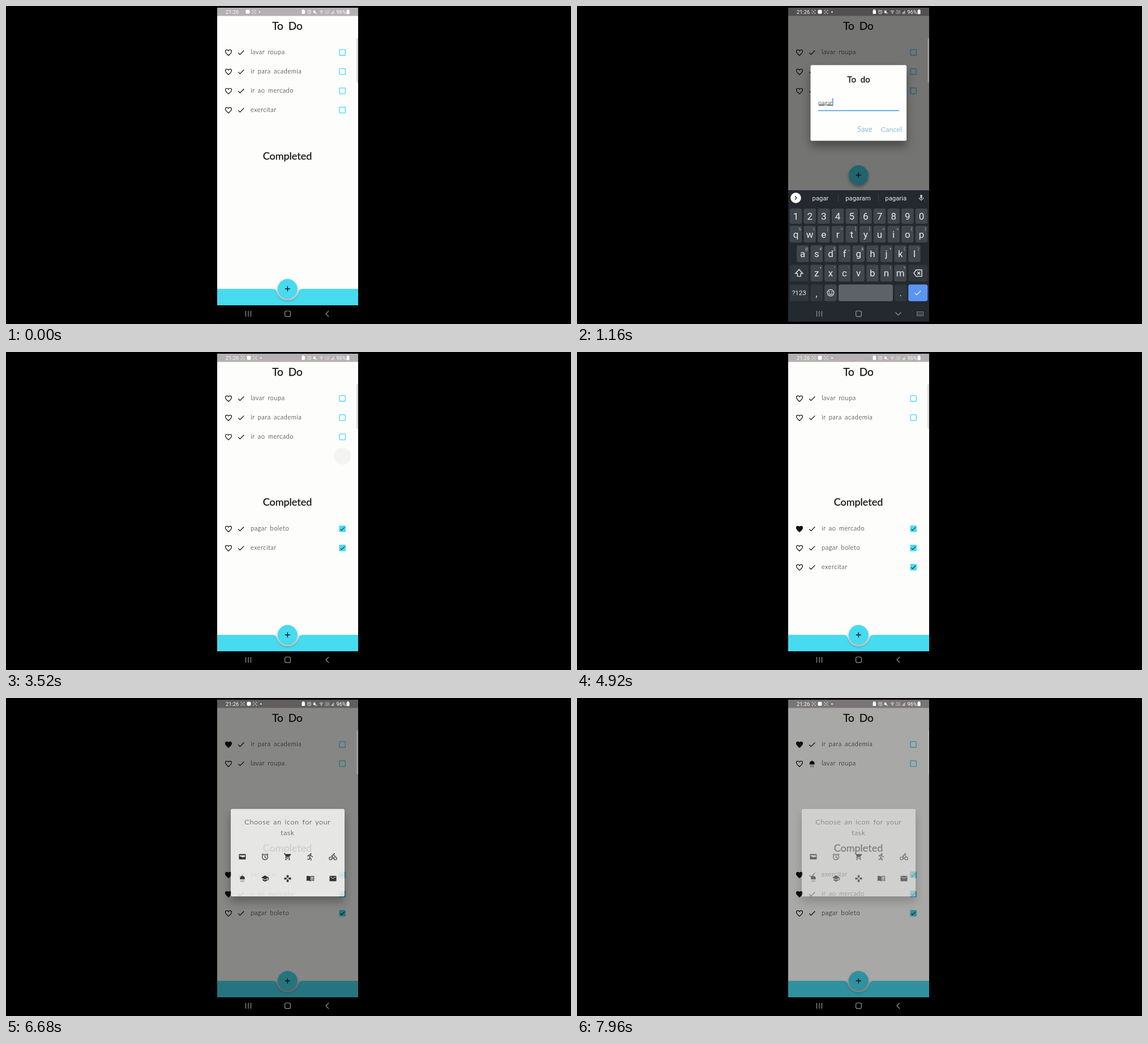
An HTML page for the animation above (8000 ms loop, 998 px wide and 561 px high).

```html
<!DOCTYPE html>
<html lang="pt">
<head>
<meta charset="utf-8">
<title>To Do</title>
<style>
  html, body { margin: 0; width: 100%; height: 100%; overflow: hidden; background: #000; }
  svg { display: block; width: 100vw; height: 100vh; }
  text { white-space: pre; }
  .hand { font-family: Lato, sans-serif; font-weight: 300; }
  .title { font-weight: 400; fill: #111; stroke: #111; stroke-width: .25; word-spacing: 4px; }
  .sys { font-family: Roboto, sans-serif; }
  .mid { text-anchor: middle; }
  .line { fill: none; stroke: currentColor; }
  .raised { filter: drop-shadow(0 3px 2.5px rgba(0,0,0,.33)); }
  .floating { filter: drop-shadow(0 10px 8px rgba(0,0,0,.36)); }
</style>
</head>
<body>
<svg viewBox="0 0 998 561">
  <defs>
    <clipPath id="phone"><rect x="373" y="3" width="249" height="554"/></clipPath>
    <clipPath id="todoArea"><rect id="todoClip" x="373" y="53" width="249" height="204"/></clipPath>
  </defs>
  <rect width="998" height="561" fill="#000"/>
  <g clip-path="url(#phone)">
    <rect x="373" y="3" width="249" height="525" fill="#f3f3f2"/>
    <rect id="page" x="373" y="3" width="249" height="525" fill="#fdfdfb"/>
    <rect x="373" y="3" width="249" height="14.5" fill="#b5b0b3"/>
    <text class="hand mid title" x="497" y="41.5" font-size="19">To Do</text>
    <g id="todo" clip-path="url(#todoArea)"></g>
    <text id="completed" class="hand mid title" x="497" font-size="18">Completed</text>
    <g id="done"></g>
    <path id="bar" class="raised" fill="#47dbf0"/>
    <g id="fab">
      <circle class="raised" r="17.4" fill="#47dbf0"/>
      <circle id="fabPress" r="17.4" fill="#000"/>
      <path d="M-4.4 0h8.8M0-4.4v8.8" stroke="#111" stroke-width="1.4"/>
    </g>
    <g id="ripples"></g>
    <rect id="scrim" x="373" y="3" width="249" height="525"/>
    <rect x="619.6" y="57" width="4" height="78" rx="2" fill="#ccc" fill-opacity=".5" stroke="#999" stroke-opacity=".5" stroke-width=".7"/>
    <g id="taskDialog"></g>
    <g id="iconDialog"></g>
    <g id="keyboard"></g>
    <g id="nav" fill="none" stroke="#999" stroke-width="1.2"></g>
    <g id="status" color="#fff" fill="#fff"></g>
  </g>
</svg>
<script>
const LOOP = 8000, STEP = 40, CYAN = '#47dbf0', KB_TRAVEL = 232, BAR_TOP = 499;
const $ = id => document.getElementById(id);
const clamp = v => Math.max(0, Math.min(1, v));
const ramp = (t, from, to) => clamp((t - from) / (to - from));
const esc = s => s.replace(/&/g, '&amp;').replace(/</g, '&lt;');
const set = (id, attrs) => { for (const k in attrs) $(id).setAttribute(k, attrs[k]); };
const put = (id, html) => { const el = $(id); if (el.lastHtml !== html) el.innerHTML = el.lastHtml = html; };
const text = (x, y, size, s, cls = 'sys mid', extra = '') =>
  `<text class="${cls}" x="${x}" y="${y}" font-size="${size}" ${extra}>${esc(s)}</text>`;
const rect = (x, y, w, h, rx, fill, extra = '') =>
  `<rect x="${x}" y="${y}" width="${w}" height="${h}" rx="${rx}" fill="${fill}" ${extra}/>`;

// Icons on a 24 unit grid
const fillIcon = d => `<path fill-rule="evenodd" d="${d}"/>`;
const lineIcon = (d, w = 2) => `<path class="line" stroke-width="${w}" d="${d}"/>`;
const ring = (x, y, r, w = 1.8) => `<circle class="line" cx="${x}" cy="${y}" r="${r}" stroke-width="${w}"/>`;
const dot = (x, y, r) => `<circle cx="${x}" cy="${y}" r="${r}"/>`;
const heartShape = 'M12 20.2C5 14.2 3 11.800 3 8.500 3 5.800 5 4 7.500 4c1.800 0 3.600 1 4.500 2.700C12.900 5 14.700 4 16.500 4 19 4 21 5.800 21 8.500c0 3.300-2 5.700-9 11.700z';
const icons = {
  heart: lineIcon(heartShape),
  heartFull: fillIcon(heartShape) + lineIcon(heartShape),
  check: fillIcon('M9 16.200L4.800 12l-1.400 1.400L9 19 21 7l-1.400-1.400z'),
  wallet: fillIcon('M4 4h16a2 2 0 0 1 2 2v12a2 2 0 0 1-2 2H4a2 2 0 0 1-2-2V6a2 2 0 0 1 2-2zM4 8v2.500l9 3 7-1.500V8z'),
  alarm: ring(12, 13, 8, 2) + lineIcon('M12 8v5.500l4 2.500M2.500 6.500L7 2.700M21.500 6.500L17 2.700'),
  cart: fillIcon('M1 2h3.300l1 2H21q1.500 0 .8 1.500L17.300 12q-.6 1-1.800 1H8.100L7.200 15H19v2H7q-2.800-.5-1.700-3l1.300-2.400L3 4H1z') + dot(7, 20, 2) + dot(17, 20, 2),
  run: dot(13.5, 3.5, 2) + lineIcon('M5.500 12V8.500l5-2 2.500.5 2 3q1.500 2 4.500 2M11.500 7l-1.500 7.500 4 3V23M10.500 14l-1.300 6-6-1.300', 2.1),
  bike: dot(15.5, 3.5, 2) + ring(5, 17, 4.2) + ring(19, 17, 4.2) + lineIcon('M12 19v-5.500L8.500 10 13 6l3 3q1.500 1.200 3.500 1.200'),
  shower: fillIcon('M11 5V3h2v2a6 6 0 0 1 6 6v3H5v-3a6 6 0 0 1 6-6z') + [8, 12, 16].map(x => dot(x, 17, 1) + dot(x, 20.5, 1)).join(''),
  school: fillIcon('M5 13.200v4L12 21l7-3.800v-4L12 17zM12 3L1 9l11 6 9-4.900V17h2V9z'),
  games: fillIcon('M15 7.500V2H9v5.500l3 3zM7.500 9H2v6h5.500l3-3zM9 16.500V22h6v-5.500l-3-3zM16.500 9l-3 3 3 3H22V9z'),
  book: fillIcon('M1 5q6-2 11 1 5-3 11-1v14q-6-2-11 1-5-3-11-1zM13 8v10q4-2 8-1V6.700q-4-1-8 1.300z') + lineIcon('M14.500 10l5-1M14.500 13l5-1M14.500 16l5-1', 1.3),
  mail: fillIcon('M20 4H4a2 2 0 0 0-2 2v12a2 2 0 0 0 2 2h16a2 2 0 0 0 2-2V6a2 2 0 0 0-2-2zm0 4l-8 5-8-5V6l8 5 8-5z'),
  sticker: lineIcon('M4 3h16v12l-6 6H4zM20 15h-6v6M8 14q3 3 6 0') + dot(9, 9, 1.4) + dot(15, 9, 1.4),
  gear: ring(12, 12, 5.5, 4) + '<circle class="line" cx="12" cy="12" r="8.800" stroke-width="3" stroke-dasharray="4.600"/>',
  mic: '<rect x="9" y="2" width="6" height="12" rx="3"/>' + lineIcon('M5.500 11q0 6 6.500 6t6.500-6M12 17v4'),
  smile: ring(12, 12, 9) + dot(8.5, 9.5, 1.5) + dot(15.5, 9.5, 1.5) + lineIcon('M7 14q5 5 10 0'),
  shift: lineIcon('M12 3L3 13h5v7h8v-7h5z'),
  backspace: lineIcon('M8 4h14v16H8L2 12zM11 8.500l7 7M18 8.500l-7 7'),
  capture: lineIcon('M3 8V3h5M16 3h5v5M21 16v5h-5M8 21H3v-5') + ring(12, 12, 3),
  mute: fillIcon('M3 9h4l6-6v18l-6-6H3z') + lineIcon('M3 3l18 18', 2.5),
  wifi: lineIcon('M2 9q10-9 20 0M6 14q6-5 12 0', 2.5) + dot(12, 19, 2.5)
};
const icon = (name, cx, cy, size = 15, color = '#111') =>
  `<g transform="translate(${cx - size / 2} ${cy - size / 2}) scale(${size / 24})" color="${color}" fill="${color}">${icons[name]}</g>`;

// Task list: each action is a time, what happens, and the task it touches
const actions = [
  [2340, 'add', 'pagar boleto'],
  [2920, 'check', 'exercitar'],
  [3320, 'check', 'pagar boleto'],
  [3760, 'fav', 'ir ao mercado'],
  [4400, 'check', 'ir ao mercado'],
  [5200, 'fav', 'exercitar'],
  [5900, 'fav', 'ir para academia'],
  [7880, 'shower', 'lavar roupa']
];
const rowY = (index, heading) => heading + 47 + index * 33.9;

function tasksAt(t) {
  const make = name => ({ name, icon: 'check' });
  const todo = ['lavar roupa', 'ir para academia', 'ir ao mercado', 'exercitar'].map(make);
  const done = [], taps = [];
  for (const [at, kind, name] of actions) {
    if (at > t) break;
    if (kind === 'add') { todo.push(make(name)); continue; }
    const list = todo.some(x => x.name === name) ? todo : done;
    const index = list.findIndex(x => x.name === name), task = list[index];
    if (kind === 'shower') task.icon = 'shower';
    if (kind === 'check') {
      taps.push({ at, y: rowY(index, 35) });
      todo.splice(index, 1);
      done.unshift(task);
    }
    if (kind === 'fav') { task.fav = true; list.splice(index, 1); list.unshift(task); }
  }
  return { todo, done, taps };
}

const row = (task, y, checked) =>
  icon(task.fav ? 'heartFull' : 'heart', 393, y + .3, 14.6) + icon(task.icon, 415.2, y) +
  text(432, y + 3.4, 11.2, task.name, 'hand', 'letter-spacing=".5" word-spacing="2" fill="#000"') +
  rect(589.1, y - 5.2, 10.2, 10.2, .5, checked ? CYAN : 'none', `stroke="${CYAN}" stroke-width="1.3"`) +
  (checked ? icon('check', 594.2, y, 11.5) : '');
const rows = (list, heading, checked) => list.map((task, i) => row(task, rowY(i, heading), checked)).join('');

// Typing
const phrase = 'pagar boleto';
const typedAt = t => t < 1180
  ? phrase.slice(0, Math.max(0, Math.min(5, Math.floor((t - 800) / 60))))
  : phrase.slice(0, Math.min(12, 6 + Math.floor((t - 1180) / 90)));

function suggestions(typed) {
  const word = typed.split(' ').pop();
  if (!word) return ['o', 'a', 'um'];
  if (word === 'pagar') return ['pagar', 'pagaram', 'pagaria'];
  if (word === 'boleto') return ['boleto', 'boletos', 'boletim'];
  return typed.includes(' ') ? [word, 'boleto', 'boletos'] : [word, 'pagar', 'pagaram'];
}

// Keyboard, drawn with its top at y = 0
const KEY_STEP = 24.67, KEY = '#40474b', DARK_KEY = '#30383d', INK = '#e8eaed';
function keyRow(letters, hints, firstX, y, h) {
  return [...letters].map((c, i) => {
    const x = firstX + i * KEY_STEP;
    return rect(x - 10.7, y - h / 2, 21.4, h, 3, KEY) + text(x, y + 6, 17, c) +
      (hints ? text(x + 7, y - 6.5, 6.5, hints[i], 'sys mid', 'fill="#bcc1c4"') : '');
  }).join('');
}
const wideKey = (x, y, w, fill) => rect(x, y - 14.8, w, 29.6, 3.5, fill);
const keys =
  keyRow('1234567890', '', 386.5, 45.7, 27) +
  keyRow('qwertyuiop', '%\\|=[]<>{}', 386.5, 77.5, 29.5) +
  keyRow('asdfghjkl', '@#$_&-+()', 398.6, 112, 29.5) +
  keyRow('zxcvbnm', '*"\':;!?', 423.2, 146.2, 29.5) +
  wideKey(376, 146.2, 33, DARK_KEY) + icon('shift', 392.3, 146.2, 17, INK) +
  wideKey(585.3, 146.2, 34, DARK_KEY) + icon('backspace', 602, 146.2, 17, INK) +
  wideKey(376, 181, 33, DARK_KEY) + text(392.3, 185, 11.5, '?123') +
  wideKey(412.5, 181, 21.4, DARK_KEY) + text(423.2, 188, 16, ',') +
  wideKey(437.2, 181, 21.4, KEY) + icon('smile', 448, 181, 15, INK) +
  wideKey(462, 181, 96, '#5d6266') +
  wideKey(561, 181, 21.4, DARK_KEY) + text(571.6, 187, 16, '.') +
  wideKey(585.3, 181, 34, '#5b95f5') + icon('check', 602, 181, 15, '#fff');

function toolbar(typed) {
  const arrow = typed ? 'M385 10.500l3 3-3 3' : 'M388 10.500l-3 3 3 3';
  const divider = x => rect(x, 8, .7, 12, 0, '#454c50');
  const tools = icon('sticker', 422, 13.6, 14, '#bfc4c7') +
    text(457.5, 17, 9, 'GIF', 'sys mid', 'font-weight="700" fill="#bfc4c7"') +
    icon('gear', 493, 13.6, 13, '#bfc4c7') + rect(523, 8.5, 11, 10.5, 1.5, '#aeb3b6') + divider(550) +
    [568.2, 572.2, 576.2].map(x => dot(x, 13.6, 1.2)).join('');
  const words = typed ? suggestions(typed).map((w, i) => text(430 + 66.6 * i, 17.5, 11.3, w)).join('') + divider(461) + divider(532) : tools;
  return `<circle cx="386.500" cy="13.500" r="9.300" fill="#fff"/><path d="${arrow}" fill="none" stroke="#222" stroke-width="1.300"/>` +
    words + icon('mic', 608, 13.5, 14, '#bfc4c7');
}

const kbShift = t => KB_TRAVEL * (t < 1500 ? Math.pow(1 - ramp(t, 540, 790), 3) : ramp(t, 2276, 2466));

// Dialogs
function taskDialog(typed, cy) {
  const cut = typed.lastIndexOf(' ') + 1;
  const entry = typed
    ? `<text id="entry" class="hand" x="426" y="${cy + 2.5}" font-size="10.500" fill="#000">${typed.slice(0, cut)}<tspan text-decoration="underline">${typed.slice(cut)}</tspan></text>`
    : text(426.5, cy + 1.5, 10.5, 'New tasks', 'hand', 'fill="#555"');
  const blue = 'fill="#2387c6" letter-spacing=".2"';
  return rect(412.5, cy - 66.8, 169.6, 133.6, 2.5, '#fefefd', 'class="floating"') +
    text(497.5, cy - 36, 15, 'To do', 'hand mid title') + entry +
    rect(426, cy + 12.8, 143, 1.5, 0, '#3a9bdc') +
    `<rect id="caret" x="426" y="${cy - 8.5}" width="1.300" height="14" fill="#2f83d6"/>` +
    text(508.5, cy + 50.5, 12.8, 'Save', 'hand mid', blue) + text(555.5, cy + 50.5, 12.5, 'Cancel', 'hand mid', blue);
}
const choices = ['wallet', 'alarm', 'cart', 'run', 'bike', 'shower', 'school', 'games', 'book', 'mail'];
const iconDialog = rect(397, 195.7, 201, 154.3, 2.5, '#fefefd', 'class="floating"') +
  ['Choose an icon for your', 'task'].map((s, i) =>
    text(497.3, 222.5 + 19.5 * i, 12.6, s, 'hand mid', 'fill="#000" letter-spacing=".6" word-spacing="2"')).join('') +
  choices.map((name, i) => icon(name, 417.5 + 40 * (i % 5), i < 5 ? 280 : 318.5, 14.5, '#222')).join('');

function statusBar(t) {
  const notices = t < 240
    ? rect(423.5, 6.5, 7, 7, 1.8, '#fff') + icon('capture', 438, 10.4, 8, '#fff') + dot(448, 10.5, 1.2)
    : icon('capture', 418, 10.4, 8, '#fff') + rect(425.5, 6.8, 7, 7, 1.8, '#fff') + icon('capture', 440, 10.4, 8, '#fff') + dot(450.5, 10.5, 1.2);
  return text(388, 13.8, 9.3, '21:26', 'sys') + notices +
    rect(522.5, 7.5, 5.5, 6.5, 1, '#fff') + '<path class="line" d="M523.700 8v-1.500h3V8"/>' +
    icon('alarm', 535.7, 10.5, 9, '#fff') + icon('mute', 546, 10.5, 9, '#fff') + icon('wifi', 557, 10.5, 8, '#fff') +
    text(567.5, 9.8, 4, 'Vo))') + text(567.5, 14, 4, 'LTE1') + '<path d="M573.500 14h6V7z" opacity=".5"/>' +
    text(583.5, 13.8, 9.3, '96%', 'sys') + rect(601.6, 7, 5, 7.2, .8, '#fff') + rect(603, 6, 2.2, 1.5, 0, '#fff');
}

function navBar(keyboardUp) {
  return '<path d="M423.500 538v10M428 538v10M432.500 538v10"/><rect x="492.600" y="538" width="9.800" height="9.800" rx="2.500"/>' +
    (keyboardUp
      ? '<path d="M562.500 540.500l5 5 5-5"/><rect x="600.500" y="539.500" width="11" height="7" stroke-width=".8"/><path d="M602 542h8.500M602 544.300h8.500" stroke-dasharray="1.200 1"/>'
      : '<path d="M570 538l-5 5 5 5"/>');
}

function ripple({ at, y }, t) {
  const age = t - at + 80;
  return age > 360 ? '' :
    `<circle cx="594" cy="${y}" r="${6 + 9 * ramp(age, 0, 180)}" opacity="${.08 * (1 - ramp(age, 180, 360))}"/>`;
}

const notched = 'M373 499H470C476 499 477 501 478.400 505A20 20 0 0 0 516.600 505C518 501 519 499 525 499H622V528H373Z';
const flat = 'M373 499H622V528H373Z';

function draw(t) {
  const shift = kbShift(t);
  const insetTop = Math.min(BAR_TOP + 26.5, 325 + kbShift(t + (t < 1500 ? 3 : -40)));
  const fabY = Math.min(BAR_TOP, insetTop - 26.5);
  const squeeze = Math.max(0, BAR_TOP - insetTop);
  const heading = 265 - squeeze / 2;

  const { todo, done } = tasksAt(t);
  put('todo', rows(todo, 35, false));
  put('done', rows(done, heading, true));
  put('ripples', tasksAt(t + 80).taps.map(tap => ripple(tap, t)).join(''));
  set('todoClip', { height: heading - 8 - 53 });
  set('completed', { y: heading + 6 });
  set('page', { height: squeeze ? insetTop - 3 : 525 });
  set('bar', { d: fabY > 478 ? notched : flat });
  set('fab', { transform: `translate(497.3 ${fabY})` });
  set('fabPress', { opacity: .12 * ramp(t, 40, 140) * (1 - ramp(t, 240, 420)) });

  const adding = ramp(t, 240, 400) * (1 - ramp(t, 2080, 2230));
  const picking = ramp(t, 6570, 6707) * (1 - ramp(t, 7880, 8031));
  set('scrim', { opacity: .54 * Math.pow(Math.max(adding, picking), .62) });

  const typed = typedAt(t);
  set('taskDialog', { opacity: adding, display: adding ? 'inline' : 'none' });
  if (adding) {
    put('taskDialog', taskDialog(typed, 171 + 102 * kbShift(Math.min(t - 60, 2000)) / KB_TRAVEL));
    set('caret', { x: 426 + (typed ? $('entry').getComputedTextLength() : 0) });
  }
  set('iconDialog', { opacity: picking, display: picking ? 'inline' : 'none' });

  set('keyboard', {
    transform: `translate(0 ${325 + shift})`,
    opacity: t < 1500 ? 1 : 1 - .65 * shift / KB_TRAVEL,
    display: shift < KB_TRAVEL ? 'inline' : 'none'
  });
  put('toolbar', toolbar(t < 2160 ? typed : ''));
  put('nav', navBar(shift < 5));
  put('status', statusBar(t));
}

put('iconDialog', iconDialog);
$('keyboard').innerHTML = rect(373, 0, 249, 234, 0, '#23292e') + `<g fill="${INK}"><g id="toolbar"></g>${keys}</g>`;

function frame(now) {
  draw(Math.floor((now + 2) / STEP) * STEP % LOOP);
  requestAnimationFrame(frame);
}
draw(0);
requestAnimationFrame(frame);
</script>
</body>
</html>
```
